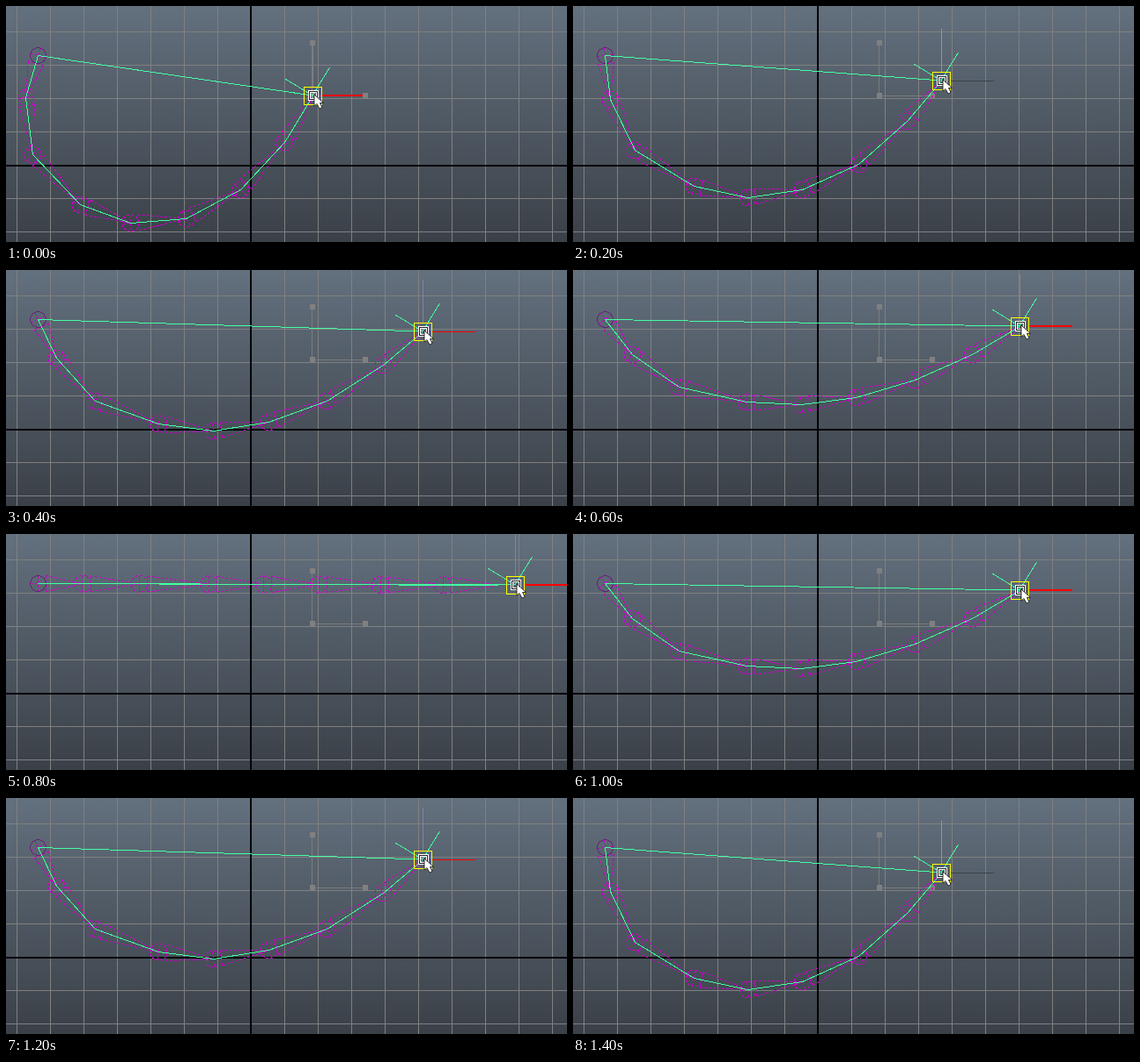
Animation, 637 px wide and 269 px high, one loop 1600 ms. Source, as an HTML page:

```html
<!DOCTYPE html>
<html lang="en">
<head>
<meta charset="utf-8">
<title>Joint chain with IK handle</title>
<style>
html, body { margin: 0; width: 100%; height: 100%; overflow: hidden; }
svg { display: block; width: 637px; height: 269px; shape-rendering: crispEdges; fill: none; }
.grid { stroke: #808080; }
.origin { stroke: #000; stroke-width: 2; }
.ghost { stroke: #7c7c7c; }
.knob { fill: #808080; }
.bone { stroke: #c800c8; stroke-dasharray: 3 2; }
.root { stroke: #68207a; }
.chain { stroke: #43ffa3; }
.pose { visibility: hidden; animation: 1.6s step-end infinite; }
#pose0 { animation-name: show0; }
#pose1 { animation-name: show1; }
#pose2 { animation-name: show2; }
#pose3 { animation-name: show3; }
#pose4 { animation-name: show4; }
@keyframes show0 { 0% { visibility: visible } 12.5%, 100% { visibility: hidden } }
@keyframes show1 { 0%, 25% { visibility: hidden } 12.5%, 87.5% { visibility: visible } 100% { visibility: hidden } }
@keyframes show2 { 0%, 37.5%, 87.5%, 100% { visibility: hidden } 25%, 75% { visibility: visible } }
@keyframes show3 { 0%, 50%, 75%, 100% { visibility: hidden } 37.5%, 62.5% { visibility: visible } }
@keyframes show4 { 0%, 62.5%, 100% { visibility: hidden } 50% { visibility: visible } }
</style>
</head>
<body>
<svg id="stage" viewBox="0 0 637 269">
  <defs>
    <linearGradient id="sky" x2="0" y2="1">
      <stop stop-color="#63707e"/>
      <stop offset="1" stop-color="#3a4047"/>
    </linearGradient>
    <g id="pointer">
      <rect x="-9.5" y="-9.5" width="20" height="20" stroke="#ff0"/>
      <rect x="-4.5" y="-5.5" width="11" height="11" stroke="#fff"/>
      <rect x="-3.5" y="-4.5" width="9" height="9" stroke="#222"/>
      <rect x="-2.5" y="-3.5" width="7" height="7" stroke="#fff"/>
      <path d="M2 -1V12L5 9.500L8 15L11 13.500L8.500 8.500H12.500Z" fill="#fff" stroke="#111" stroke-width=".8" shape-rendering="auto"/>
    </g>
  </defs>
  <rect width="637" height="269" fill="url(#sky)"/>
</svg>
<script>
const stage = document.getElementById('stage');
const root = [36, 56];

// Joints after the root; the last one is the handle.
const bends = [
  [[22, 104], [30, 169], [84, 226], [141, 247], [204, 242], [266, 209], [316, 155], [348, 102]],
  [[42, 106], [70, 164], [137, 205], [198, 218], [260, 209], [324, 180], [379, 131], [418, 85]],
  [[57, 100], [101, 149], [173, 175], [235, 183], [298, 173], [364, 149], [428, 108], [473, 70]],
  [[67, 96], [120, 133], [197, 150], [259, 153], [321, 145], [388, 125], [453, 96], [507, 64]]
];
const axes = [
  { x: '#f00', xw: 2, y: '#808080' },
  { x: '#3c4248', xw: 1, y: '#0f0' },
  { x: '#f00', xw: 1, y: '#8084a0' },
  { x: '#f00', xw: 2, y: '#858585' },
  { x: '#f00', xw: 2, y: '#858585' }
];

function add(parent, tag, attrs) {
  const el = document.createElementNS('http://www.w3.org/2000/svg', tag);
  for (const key in attrs) el.setAttribute(key, attrs[key]);
  return parent.appendChild(el);
}
const path = (parent, cls, d, more) => add(parent, 'path', { class: cls, d, ...more });
const ring = (parent, cls, [cx, cy], r) =>
  add(parent, 'circle', { class: cls, cx: cx + .5, cy: cy + .5, r });

function drawGrid() {
  let d = '';
  for (let x = 12.5; x < 637; x += 38) d += `M${x} 0V269`;
  for (let y = 29.5; y < 269; y += 38) d += `M0 ${y}H637`;
  path(stage, 'grid', d);
  path(stage, 'origin', 'M278 0V269M0 182H637');
}

function drawGhost() {
  path(stage, 'ghost', 'M347.5 42V102.500H408');
  for (const [x, y] of [[348, 42], [348, 102], [408, 102]])
    add(stage, 'rect', { class: 'knob', x: x - 3, y: y - 3, width: 6, height: 6 });
}

// Tapered bone with the cross of its joint.
function drawBone(g, [ax, ay], [bx, by]) {
  const len = Math.hypot(bx - ax, by - ay);
  const ux = (bx - ax) / len, uy = (by - ay) / len;
  const at = (along, side) =>
    `${(ax + .5 + ux * along - uy * side).toFixed(1)} ${(ay + .5 + uy * along + ux * side).toFixed(1)}`;
  path(g, 'bone', `M${at(9, 9)}L${at(len, 0)}M${at(9, -9)}L${at(len, 0)}M${at(9, -9)}L${at(9, 9)}`);
  path(g, 'bone', `M${at(0, -9)}L${at(0, 9)}M${at(-9, 0)}L${at(9, 0)}`);
}

function drawPose(joints, [hx, hy], axis, i) {
  const g = add(stage, 'g', { id: 'pose' + i, class: 'pose' });
  const pts = [root, ...joints];
  for (let k = 0; k < pts.length - 1; k++) {
    drawBone(g, pts[k], pts[k + 1]);
    if (k) ring(g, 'bone', pts[k], 9.5);
  }
  ring(g, 'root', root, 9);
  const line = pts.map(([x, y]) => `${x + .5} ${y + .5}`).join('L');
  path(g, 'chain', `M${line}M36.5 56.5L${hx} ${hy}`);
  path(g, 'chain', `M${hx - 31} ${hy - 19}L${hx} ${hy}L${hx + 19.5} ${hy - 32}`);
  const y = axis.xw === 2 ? hy : hy + .5;
  path(g, '', `M${hx + 10} ${y}H${hx + 60}`, { stroke: axis.x, 'stroke-width': axis.xw });
  path(g, '', `M${hx + .5} ${hy - 10}V${hy - 59}`, { stroke: axis.y });
  if (!i) add(g, 'rect', { class: 'knob', x: 405, y: 99, width: 6, height: 6 });
  add(g, 'use', { href: '#pointer', x: hx, y: hy });
}

// Handle out of reach: the chain lies straight towards it.
function stretch([hx, hy]) {
  const pts = [root, ...bends[3]];
  const dist = Math.hypot(hx - root[0], hy - root[1]);
  let sum = 0;
  return bends[3].map(([x, y], k) => {
    sum += Math.hypot(x - pts[k][0], y - pts[k][1]);
    return [root[0] + (hx - root[0]) * sum / dist, root[1] + (hy - root[1]) * sum / dist];
  });
}

drawGrid();
drawGhost();
bends.forEach((joints, i) => drawPose(joints, joints[7], axes[i], i));
const far = [578, 58];
drawPose(stretch(far), far, axes[4], 4);
</script>
</body>
</html>
```
